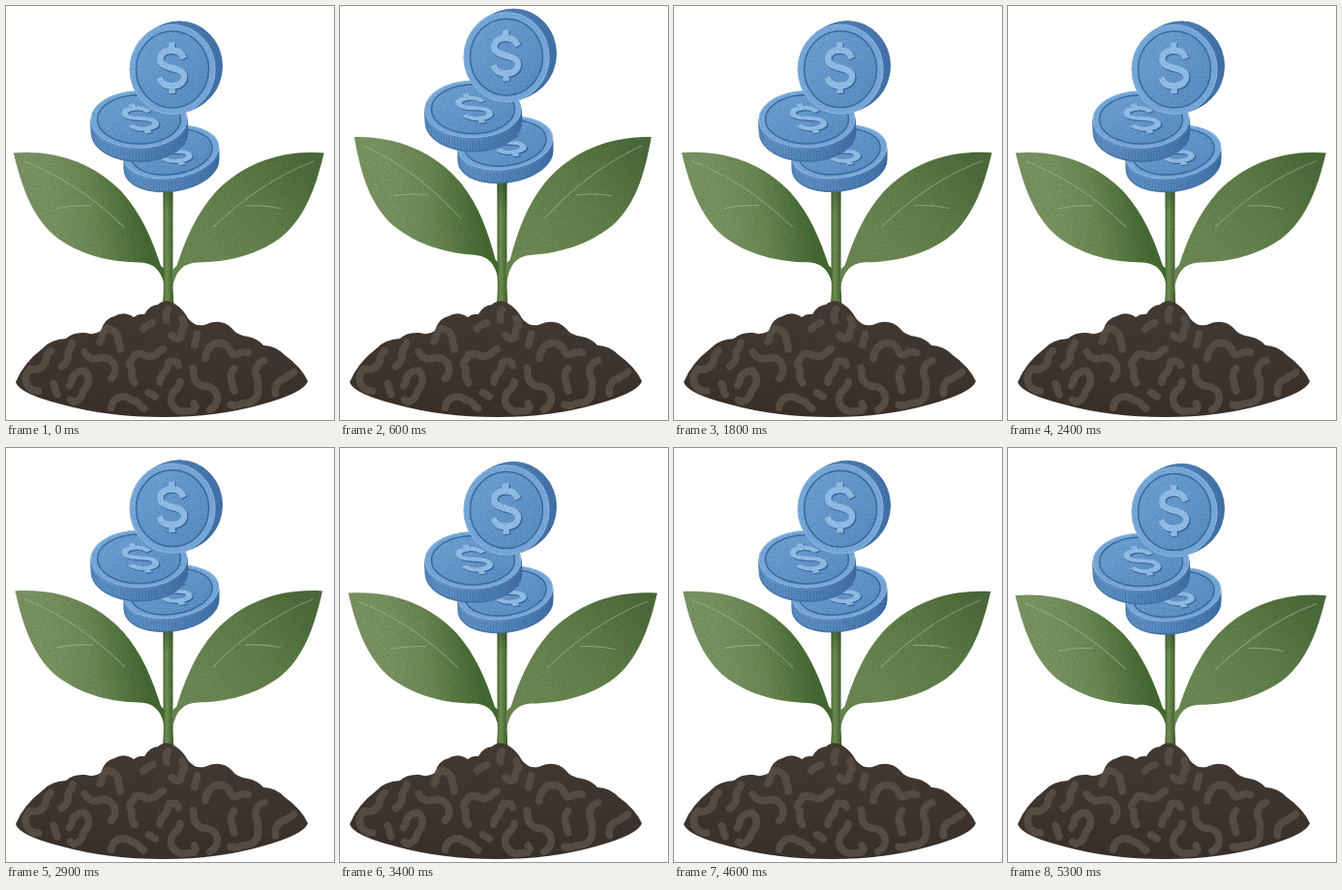
Animation of 339 by 427 pixels, one loop 5.4 s. Source, as an HTML page:

```html
<!DOCTYPE html>
<html lang="en">
<head>
<meta charset="utf-8">
<title>Growing coins</title>
<style>
  html, body { margin: 0; width: 100%; height: 100%; overflow: hidden; background: #fff; }
  svg { display: block; width: 100vw; height: 100vh; }
</style>
</head>
<body>
<svg id="stage" viewBox="0 0 339 427">
  <defs>
    <linearGradient id="leftFill" gradientUnits="userSpaceOnUse" x1="50" y1="228" x2="140" y2="212">
      <stop offset="0" stop-color="#7a9463"/>
      <stop offset=".45" stop-color="#6a8952"/>
      <stop offset="1" stop-color="#456a32"/>
    </linearGradient>
    <linearGradient id="rightFill" gradientUnits="userSpaceOnUse" x1="125" y1="250" x2="20" y2="165">
      <stop offset="0" stop-color="#6b8953"/>
      <stop offset=".5" stop-color="#5e7e48"/>
      <stop offset="1" stop-color="#4b6b3a"/>
    </linearGradient>
    <linearGradient id="stemFill">
      <stop offset="0" stop-color="#46682f"/>
      <stop offset=".35" stop-color="#729355"/>
      <stop offset="1" stop-color="#3b5c2a"/>
    </linearGradient>
    <linearGradient id="stemShade" x2="0" y2="1">
      <stop offset="0" stop-color="#243c20" stop-opacity=".6"/>
      <stop offset=".35" stop-color="#243c20" stop-opacity="0"/>
    </linearGradient>
    <linearGradient id="soilFill" x2="0" y2="1">
      <stop offset="0" stop-color="#463b33"/>
      <stop offset=".55" stop-color="#40362f"/>
      <stop offset="1" stop-color="#3a302a"/>
    </linearGradient>
    <linearGradient id="faceFill" x2="1" y2="1">
      <stop offset="0" stop-color="#70a3d6"/>
      <stop offset="1" stop-color="#5a8ec5"/>
    </linearGradient>
    <linearGradient id="sideFill">
      <stop offset="0" stop-color="#6a9dd1"/>
      <stop offset=".5" stop-color="#5588bf"/>
      <stop offset="1" stop-color="#4577ae"/>
    </linearGradient>
    <filter id="grain" filterUnits="userSpaceOnUse" x="0" y="0" width="339" height="427" color-interpolation-filters="sRGB">
      <feTurbulence type="fractalNoise" baseFrequency=".75" numOctaves="2" seed="4"/>
      <feColorMatrix values="0 0 0 0 0  0 0 0 0 0  0 0 0 0 0  .35 0 0 0 -.15"/>
      <feComposite operator="in" in2="SourceAlpha" result="specks"/>
      <feMerge><feMergeNode in="SourceGraphic"/><feMergeNode in="specks"/></feMerge>
    </filter>
    <path id="soilShape" d="M10 388Q18 368 38 353Q46 344 62 343Q69 336 82 337Q91 340 98 335Q102 322 112 320Q122 314 132 321Q137 317 143 318Q149 308 157 308Q166 300 177 309Q183 313 188 322Q195 331 205 329Q222 321 233 332Q239 340 250 341Q260 343 266 350Q278 350 288 360Q305 372 312 387Q308 399 264 411Q218 424 163 424Q105 424 58 411Q14 400 10 388Z"/>
    <clipPath id="soilClip"><use href="#soilShape"/></clipPath>
    <g id="leaf">
      <path d="M7.800 151.500C50 148 90 161 119.500 191.500C140 214 151 241 160 268L169 276L168 302L166 300C163 276 156 265 138 264.500C108 264 80 258 54 240C29 221 17 190 7.800 151.500Z"/>
      <g fill="none" stroke="#b3c69e" stroke-linecap="round">
        <path stroke-width="1.100" opacity=".5" d="M18 160C55 174 92 199 122 228"/>
        <path stroke-width="1.100" opacity=".6" d="M52 209Q70 205 88 206"/>
      </g>
    </g>
  </defs>
  <g filter="url(#grain)">
    <path fill="url(#stemFill)" d="M162.500 160H172.500V270Q172 290 173.500 312H162Q163.500 290 162.500 270Z"/>
    <rect x="162.500" y="178" width="10" height="100" fill="url(#stemShade)"/>
    <g id="left" fill="url(#leftFill)"><use href="#leaf"/></g>
    <g transform="matrix(-1 0 0 1 336.500 0)"><g id="right" fill="url(#rightFill)"><use href="#leaf"/></g></g>
    <path fill="url(#stemFill)" d="M163.500 262H171.500Q171.500 290 173.500 312H162Q164 290 163.500 262Z"/>
    <use href="#soilShape" fill="url(#soilFill)"/>
    <path id="furrows" clip-path="url(#soilClip)" fill="none" stroke="#5a4e44" stroke-width="7.600" stroke-linecap="round" stroke-linejoin="round"/>
    <g id="coins"></g>
  </g>
</svg>
<script>
const $ = id => document.getElementById(id);
const LOOP = 5400, STEP = 100;

// [time in ms, lift]
const LIFT = [
  [0, 0], [250, .76], [450, 1.13], [600, 1], [900, .7], [1300, .37],
  [1800, .02], [2100, -.1], [2400, 0], [2900, .25], [3100, .28],
  [3600, 0], [3900, -.1], [4200, 0], [4650, .23], [4850, .22],
  [5200, 0], [5300, -.04], [5400, 0]
];

const COINS = [
  { cx: 171, cy: 150.5, rx: 49.5, ry: 27, tilt: -8, dx: 0, dy: 14, mark: '1 -.15 .38 .55 173 150', rise: 9 },
  { cx: 137.5, cy: 117, rx: 50, ry: 29.5, tilt: 0, dx: 0.5, dy: 14.5, mark: '1 -.12 .36 .6 138.5 116', rise: 10.6 },
  { cx: 172, cy: 65.5, rx: 44.5, ry: 46.5, tilt: 0, dx: 7.5, dy: -3.5, mark: '1 -.04 .01 1.05 171.5 64', rise: 12.8 }
];

const DOLLAR = 'M12.5 -9C10 -15 6 -17.5 0 -17.5C-8 -17.5 -12 -14 -12 -9C-12 2 12.5 -2 12.5 9' +
  'C12.5 14 8 17.5 0 17.5C-6 17.5 -11 15 -13 9M0 -25V-17M0 17V25';

function coinMarkup({ cx, cy, rx, ry, tilt, dx, dy, mark }) {
  const ring = (x, y, inset, attrs) =>
    `<ellipse cx="${x}" cy="${y}" rx="${rx - inset}" ry="${ry - inset * Math.min(1, ry / rx)}" ` +
    `transform="rotate(${tilt} ${x} ${y})" ${attrs}/>`;
  let out = ring(cx + dx, cy + dy, .4, 'fill="#4577ae" stroke="#4475ab" stroke-width=".8"');
  for (let i = 9; i > 0; i--) out += ring(cx + dx * i / 10, cy + dy * i / 10, 0, 'fill="url(#sideFill)"');

  const r = tilt * Math.PI / 180;
  let ridges = '';
  for (let k = 0; k < 96; k++) {
    const a = k * Math.PI / 48, u = rx * Math.cos(a), v = ry * Math.sin(a);
    const x = cx + u * Math.cos(r) - v * Math.sin(r), y = cy + u * Math.sin(r) + v * Math.cos(r);
    ridges += `M${x + dx * .2} ${y + dy * .2}l${dx * .75} ${dy * .75}`;
  }
  out += `<path d="${ridges}" stroke="#2f5c93" stroke-width=".9" opacity=".4"/>`;
  out += ring(cx, cy, .4, 'fill="#78abdc" stroke="#8fbde8" stroke-width="1"');
  out += ring(cx, cy, 7, 'fill="url(#faceFill)" stroke="#3b6ca4" stroke-width="1.5"');
  const stroke = (color, shift, w) =>
    `<path d="${DOLLAR}" transform="translate(${shift} ${shift}) matrix(${mark})" fill="none" stroke="${color}" stroke-width="${w}"/>`;
  return out + stroke('#38689f', 1, 7) + stroke('#93bfe9', 0, 6.4);
}

for (const c of COINS) {
  c.el = document.createElementNS('http://www.w3.org/2000/svg', 'g');
  c.el.innerHTML = coinMarkup(c);
  $('coins').append(c.el);
}

// Winding trails that keep clear of one another
function growFurrows() {
  const GAP = 14.5, STRIDE = 4;
  let seed = 29;
  const rand = () => (seed = seed * 16807 % 2147483647) / 2147483647;
  const soil = new Path2D($('soilShape').getAttribute('d'));
  const ctx = document.createElement('canvas').getContext('2d');
  const inside = (x, y) => ctx.isPointInPath(soil, x, y - 8) && ctx.isPointInPath(soil, x, y + 5);
  const placed = [];
  const clear = (x, y, own) => inside(x, y) &&
    [...placed, ...own.slice(0, -5)].every(p => Math.hypot(p[0] - x, p[1] - y) > GAP);
  let d = '';
  for (let n = 0; n < 900; n++) {
    let x = 16 + rand() * 292, y = 316 + rand() * 104, a = rand() * 6.283, bend = rand() < .5 ? .32 : -.32;
    const trail = [], length = 10 + rand() * 14;
    if (!clear(x, y, trail)) continue;
    trail.push([x, y]);
    while (trail.length < length) {
      if (rand() < .25) bend = -bend;
      const turn = [bend, 0, -bend, bend * 3, -bend * 3].find(b =>
        clear(x + STRIDE * Math.cos(a + b), y + STRIDE * Math.sin(a + b), trail));
      if (turn === undefined) break;
      a += turn;
      x += STRIDE * Math.cos(a);
      y += STRIDE * Math.sin(a);
      trail.push([x, y]);
    }
    if (trail.length < 3) continue;
    placed.push(...trail);
    d += 'M' + trail.map(p => p.map(v => v.toFixed(1)).join(' ')).join('L');
  }
  $('furrows').setAttribute('d', d);
}

function liftAt(t) {
  const i = LIFT.findIndex(k => k[0] > t), last = LIFT.length - 1;
  const [t0, v0] = LIFT[i - 1], [t1, v1] = LIFT[i];
  const slope = k => {
    const a = LIFT[Math.max(0, k - 1)], b = LIFT[Math.min(last, k + 1)];
    return (b[1] - a[1]) / (b[0] - a[0]);
  };
  const span = t1 - t0, u = (t - t0) / span, w = 1 - u;
  return v0 * w * w * (1 + 2 * u) + v1 * u * u * (3 - 2 * u) +
    span * u * w * (w * slope(i - 1) - u * slope(i));
}

function draw(now) {
  const t = Math.floor(Math.max(0, now - start) % LOOP / STEP) * STEP;
  const p = liftAt(t);
  const pose = `translate(163 ${280 - 6 * p}) rotate(${3.5 * p}) scale(${1 + .008 * p}) translate(-163 -280)`;
  $('left').setAttribute('transform', pose);
  $('right').setAttribute('transform', pose);
  for (const c of COINS) c.el.setAttribute('transform', `translate(0 ${-c.rise * p})`);
  requestAnimationFrame(draw);
}

growFurrows();
const start = performance.now();
draw(start);
</script>
</body>
</html>
```
